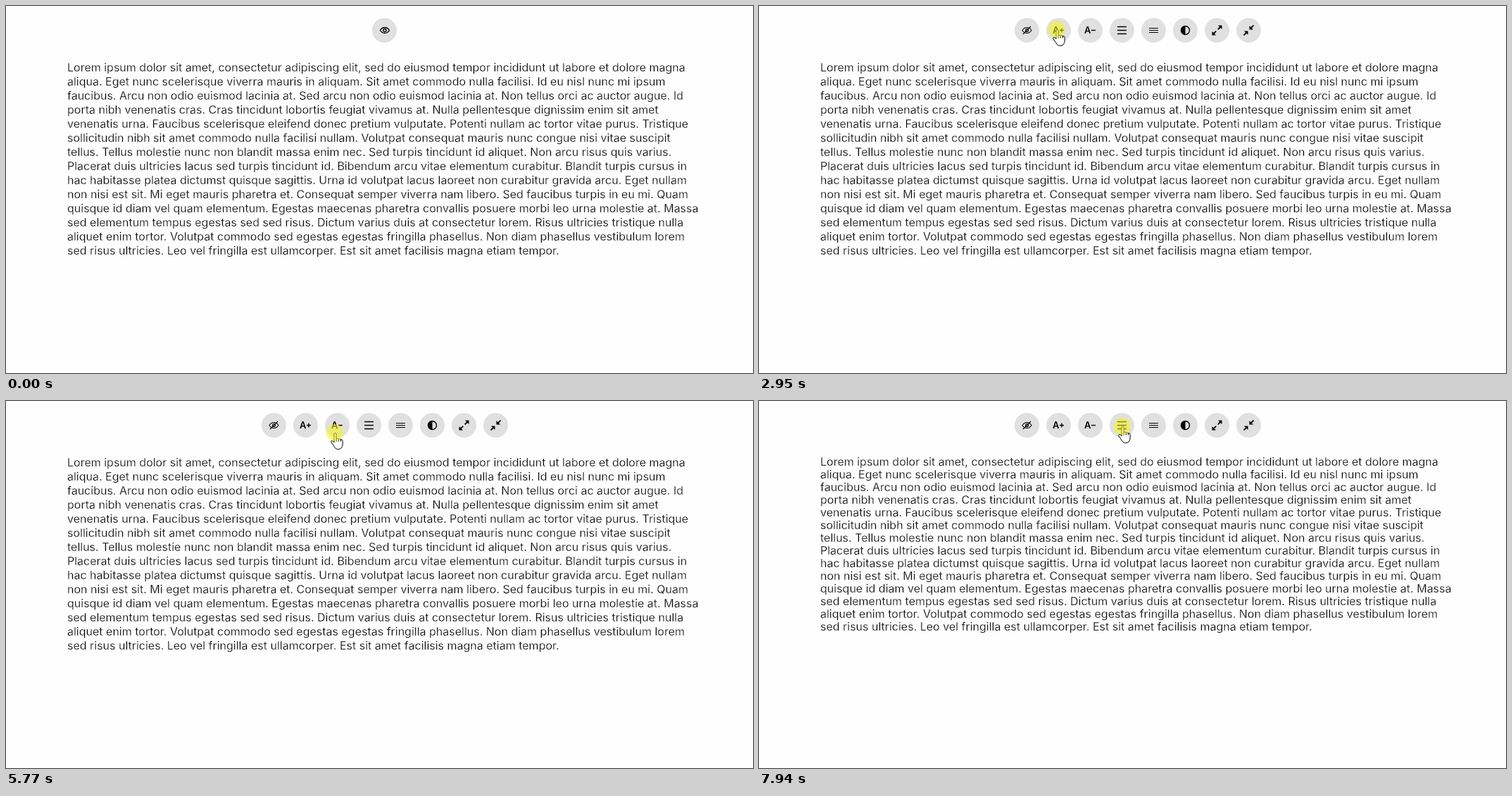
Animation, 1061 px wide and 521 px high, one loop 8 s. Source, as an HTML page:

```html
<!DOCTYPE html>
<html lang="la">
<head>
<meta charset="utf-8">
<title>Reading tools</title>
<style>
  html, body { margin: 0; width: 100%; height: 100%; overflow: hidden; background: #fefefe; }
  #text {
    position: absolute; left: 87px; top: 77px; width: 900px; margin: 0;
    font-family: Inter, sans-serif; color: #000;
    /* thins the stems without changing the letter widths */
    -webkit-text-stroke: .3px #fefefe;
  }
  svg { position: absolute; left: 0; top: 0; }
  .button > circle { fill: #e0e0e0; }
  .icon { fill: none; stroke: #000; stroke-width: 1.4; }
  .icon text { font: 600 13px Inter, sans-serif; fill: #000; stroke: none; }
  .icon .solid { fill: #000; stroke: none; }
  .icon .thin { stroke-width: 1.1; }
  #pointer path { fill: #fff; stroke: #000; }
  #pointer .bare { fill: none; }
  #glow { fill: #f5f514; fill-opacity: .55; }
</style>
</head>
<body>
<p id="text">Lorem ipsum dolor sit amet, consectetur adipiscing elit, sed do eiusmod tempor incididunt ut labore et dolore magna aliqua. Eget nunc scelerisque viverra mauris in aliquam. Sit amet commodo nulla facilisi. Id eu nisl nunc mi ipsum faucibus. Arcu non odio euismod lacinia at. Sed arcu non odio euismod lacinia at. Non tellus orci ac auctor augue. Id porta nibh venenatis cras. Cras tincidunt lobortis feugiat vivamus at. Nulla pellentesque dignissim enim sit amet venenatis urna. Faucibus scelerisque eleifend donec pretium vulputate. Potenti nullam ac tortor vitae purus. Tristique sollicitudin nibh sit amet commodo nulla facilisi nullam. Volutpat consequat mauris nunc congue nisi vitae suscipit tellus. Tellus molestie nunc non blandit massa enim nec. Sed turpis tincidunt id aliquet. Non arcu risus quis varius. Placerat duis ultricies lacus sed turpis tincidunt id. Bibendum arcu vitae elementum curabitur. Blandit turpis cursus in hac habitasse platea dictumst quisque sagittis. Urna id volutpat lacus laoreet non curabitur gravida arcu. Eget nullam non nisi est sit. Mi eget mauris pharetra et. Consequat semper viverra nam libero. Sed faucibus turpis in eu mi. Quam quisque id diam vel quam elementum. Egestas maecenas pharetra convallis posuere morbi leo urna molestie at. Massa sed elementum tempus egestas sed sed risus. Dictum varius duis at consectetur lorem. Risus ultricies tristique nulla aliquet enim tortor. Volutpat commodo sed egestas egestas fringilla phasellus. Non diam phasellus vestibulum lorem sed risus ultricies. Leo vel fringilla est ullamcorper. Est sit amet facilisis magna etiam tempor.</p>

<svg width="1061" height="521">
  <g id="closed"></g>
  <g id="open"></g>
  <g id="pointer">
    <g data-shape="arrow"><path d="M.5.5v16l3.7-3.6 2.6 5.6 2.3-1-2.5-5.5h5z"/></g>
    <g data-shape="beam"><path class="bare" d="M-3-8.5h2.5l.5.5.5-.5H3M0-8V8M-3 8.5h2.5L0 8l.5.5H3"/></g>
    <g data-shape="hand" transform="translate(-6)">
      <path d="M5 13.6V2a1.6 1.6 0 0 1 3.2 0v6.6q1.7-1 3.2.3 1.7-.8 3 .7 2.8-.2 2.8 2.2V16q0 4-2.2 6-1.6 1.5-4.3 1.5T6.6 21.8Q4 18 1 13.6q-.8-1.8.8-2.2 1.6 0 3.2 2.2z"/>
      <path class="bare" d="M8.2 8.6v4M11.4 8.9v3.600M14.4 9.6v3"/>
    </g>
  </g>
  <circle id="glow" r="12"/>
</svg>

<script>
const LOOP = 8000, ROW = 34.5, RADIUS = 17.5;
const $ = id => document.getElementById(id);

const eye = '<path d="M-6.5 0Q-4-4 0-4T6.5 0Q4 4 0 4T-6.5 0z"/><circle r="2"/>';
const letter = sign => `<text x="-8.5" y="4.5">A</text><path d="${sign}"/>`;
const bars = gap => `<path d="M-6.5 ${-gap}h13M-6.5 0h13M-6.5 ${gap}h13"/>`;
const thin = icon => `<g class="thin">${icon}</g>`;
const arrows = (head, shaft) => [0, 180].map(turn =>
  `<g transform="rotate(${turn})"><path class="solid" d="${head}"/><path stroke-width="1.8" d="${shaft}"/></g>`).join('');

const icons = [
  thin(eye + '<path d="M-5.5 5.5l11-11"/>'),
  letter('M1.5 0h6M4.5-3v6'),
  letter('M1.5 0h6'),
  bars(5),
  thin(bars(3)),
  '<circle r="6"/><path class="solid" d="M0-6a6 6 0 0 0 0 12z"/>',
  arrows('M7-7v5.5L1.5-7z', 'M1.2-1.2L5-5'),
  arrows('M1-1v-5.5L6.5-1z', 'M3-3L7-7')
];

const button = (x, icon) => `<g class="button" transform="translate(${x} ${ROW})">
  <circle r="${RADIUS}"/><g class="icon">${icon}</g></g>`;

const closedX = [537.5];
const openX = icons.map((_, i) => 380.5 + 45 * i);
$('closed').innerHTML = button(closedX[0], `<g transform="translate(.5)">${eye}</g>`);
$('open').innerHTML = icons.map((icon, i) => button(openX[i], icon)).join('');

const OPENS = 1890;
// time, font size, line height
const layouts = [
  [0, 16, 20], [3020, 17, 20], [3570, 18, 21], [5370, 17, 20],
  [5770, 16, 20], [7070, 16, 16], [7540, 16, 17], [7810, 16, 18]
];
const presses = [
  [1820, 1890], [2950, 3020], [3440, 3570], [5240, 5370], [5710, 5840],
  [6990, 7070], [7470, 7540], [7740, 7810], [7940, 8000]
];
// first and last change, number of changes, end point
const START = [996, 437];
const moves = [
  [200, 940, 12, [563, 47]],
  [1010, 1230, 4, [535, 38]],
  [1955, 2620, 11, [423, 33]],
  [4100, 4360, 5, [467, 45]],
  [6240, 6720, 8, [516, 36]]
];
const ease = p => (1 - Math.cos(Math.PI * p)) / 2;

function pointerAt(t) {
  let [x, y] = START;
  for (const [from, to, count, [endX, endY]] of moves) {
    if (t < from) break;
    const step = Math.min(count, 1 + Math.floor((t - from) / (to - from) * (count - 1)));
    const p = ease(step / count);
    x += (endX - x) * p;
    y += (endY - y) * p;
  }
  return [Math.round(x), Math.round(y)];
}

function shapeAt(x, y, centres) {
  if (centres.some(c => Math.hypot(x - c, y - ROW) < RADIUS)) return 'hand';
  return x > 87 && x < 987 && y > 77 && y < 357 ? 'beam' : 'arrow';
}

const show = (el, on) => { el.style.display = on ? '' : 'none'; };

function render(t) {
  const opened = t >= OPENS;
  show($('closed'), !opened);
  show($('open'), opened);

  const [, size, leading] = layouts.filter(l => l[0] <= t).pop();
  $('text').style.fontSize = size + 'px';
  $('text').style.lineHeight = leading + 'px';

  const [x, y] = pointerAt(t);
  const place = `translate(${x} ${y})`;
  const shape = shapeAt(x, y, opened ? openX : closedX);
  show($('pointer'), t >= moves[0][0]);
  $('pointer').setAttribute('transform', place);
  for (const el of $('pointer').children) show(el, el.dataset.shape === shape);

  $('glow').setAttribute('transform', place);
  show($('glow'), presses.some(([down, up]) => t >= down && t < up));
}

const began = performance.now();
function tick() {
  render((performance.now() - began) % LOOP);
  requestAnimationFrame(tick);
}
tick();
</script>
</body>
</html>
```
